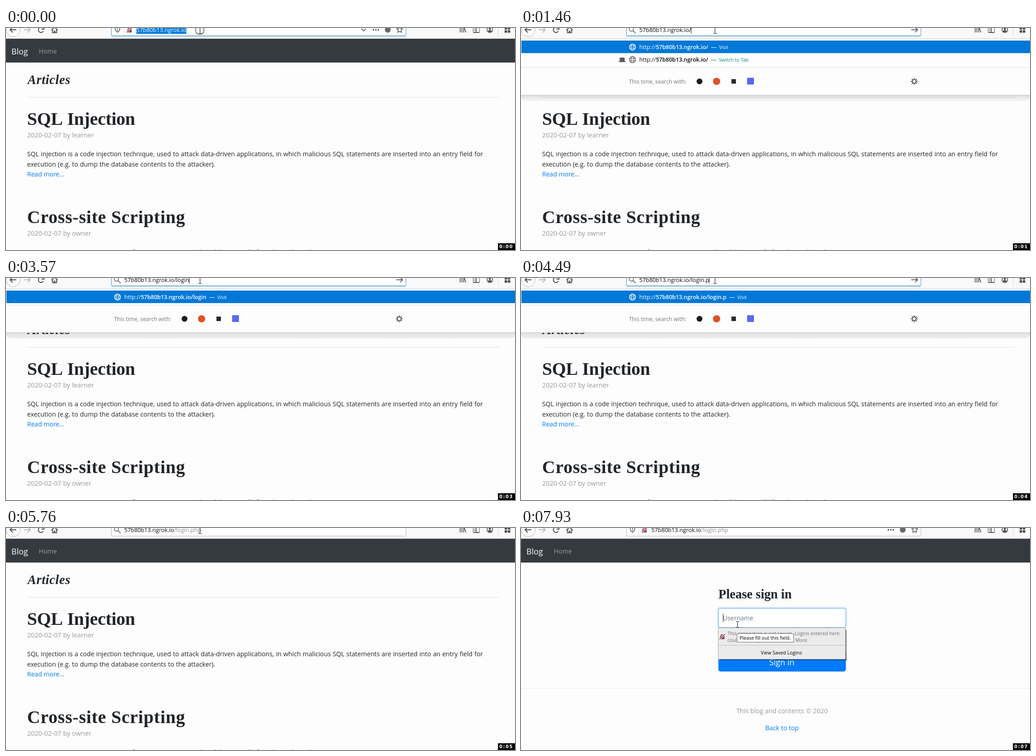
Recreate the animation shown at these times as an HTML page with a canvas. Size 1132 by 495 pixels, loop 8 s.

```html
<!DOCTYPE html>
<html lang="en">
<head>
<meta charset="utf-8">
<title>Blog sign in</title>
<style>
html, body { margin: 0; width: 100%; height: 100%; overflow: hidden; background: #fdfdfd; }
canvas { display: block; }
</style>
</head>
<body>
<canvas id="stage" width="1132" height="495"></canvas>
<script>
const W = 1132, H = 495, LOOP = 8000;
const ctx = document.getElementById('stage').getContext('2d', { alpha: false });
const SANS = '"Open Sans", "Noto Sans", sans-serif';
const SERIF = '"Liberation Serif", "Noto Serif", serif';
const CLOCK_FACE = '"DejaVu Sans", sans-serif';
const HOST = '57b80b13.ngrok.io';
const INK = '#212529', ICON = '#4c4c50', LINK = '#007bff', BLUE = '#0078d7';

// [time, path in the address bar]
const TYPED = [[1320, '/'], [2440, '/l'], [2680, '/lo'], [3070, '/log'], [3320, '/logi'],
  [3570, '/login'], [4100, '/login.'], [4370, '/login.p'], [4790, '/login.ph'], [5210, '/login.php']];
// [time, path in the suggestion row]
const SUGGESTED = [[1460, '/'], [2560, '/l'], [2680, '/lo'], [3170, '/log'], [3320, '/logi'],
  [3570, '/login'], [4220, '/login.'], [4490, '/login.p'], [4790, '/login.ph'], [5330, '/login.php']];
const CLOCK = [[0, 0], [1030, 1], [2140, 2], [3170, 3], [4000, 4], [5060, 5], [6120, 6], [7190, 7]];
const CARET_OFF = [[0, 150], [400, 930], [2020, 2440], [2950, 3070], [3880, 4100], [4940, 5210], [5480, LOOP]];

const at = (list, t) => list.reduce((v, [from, value]) => t >= from ? value : v, '');
const within = (t, a, b) => t >= a && t < b;

function rect(x, y, w, h, color) {
  ctx.fillStyle = color;
  ctx.fillRect(x, y, w, h);
}

function text(str, x, y, size, color, o = {}) {
  ctx.font = `${o.style || ''} ${size}px ${o.face || SANS}`;
  ctx.letterSpacing = (o.gap || 0) + 'px';
  ctx.wordSpacing = (o.space || 0) + 'px';
  ctx.textAlign = o.align || 'left';
  ctx.fillStyle = color;
  ctx.fillText(str, x, y);
  return ctx.measureText(str).width;
}

// Open polyline from flat coordinates
function line(points, color = ICON, width = 1.6) {
  ctx.beginPath();
  for (let i = 0; i < points.length; i += 2) ctx.lineTo(points[i], points[i + 1]);
  ctx.strokeStyle = color;
  ctx.lineWidth = width;
  ctx.stroke();
}

function arc(x, y, r, color = ICON, width = 1.6, a = 0, b = Math.PI * 2) {
  ctx.beginPath();
  ctx.arc(x, y, r, a, b);
  ctx.strokeStyle = color;
  ctx.lineWidth = width;
  ctx.stroke();
}

function dot(x, y, r, color) {
  ctx.beginPath();
  ctx.arc(x, y, r, 0, Math.PI * 2);
  ctx.fillStyle = color;
  ctx.fill();
}

function box(x, y, w, h, r, fill, stroke) {
  ctx.beginPath();
  ctx.roundRect(x, y, w, h, r);
  if (fill) { ctx.fillStyle = fill; ctx.fill(); }
  if (stroke) { ctx.strokeStyle = stroke; ctx.lineWidth = 1; ctx.stroke(); }
}

function lock(x, y) {
  box(x - 5, y - 1, 10, 7, 1, '#5a5a5e');
  arc(x, y - 1, 3, '#5a5a5e', 1.8, Math.PI, 0);
  line([x - 6, y + 6, x + 6, y - 5], '#fff', 3.5);
  line([x - 6, y + 6, x + 6, y - 5], '#e22850', 2);
}

function globe(x, y, color) {
  arc(x, y, 6.8, color, 1.5);
  ctx.beginPath();
  ctx.ellipse(x, y, 3, 6.8, 0, 0, Math.PI * 2);
  ctx.lineWidth = 1.1;
  ctx.stroke();
  line([x - 6.5, y - 2.5, x + 6.5, y - 2.5], color, 1.1);
  line([x - 6.5, y + 2.5, x + 6.5, y + 2.5], color, 1.1);
}

function gear(x, y) {
  for (let i = 0; i < 8; i++) {
    const c = Math.cos(i * Math.PI / 4), s = Math.sin(i * Math.PI / 4);
    line([x + c * 4, y + s * 4, x + c * 7.5, y + s * 7.5], ICON, 2);
  }
  arc(x, y, 4, ICON, 1.7);
}

function star(x, y) {
  const pts = [];
  for (let i = 0; i <= 10; i++) {
    const r = i % 2 ? 3.4 : 7, a = i * Math.PI / 5 - Math.PI / 2;
    pts.push(x + r * Math.cos(a), y + r * Math.sin(a));
  }
  line(pts, ICON, 1.4);
}

function toolbar(t) {
  rect(0, 0, W, 24, '#f9f9fa');
  rect(0, 23, W, 1, '#d4d4d6');
  dot(16, 4, 15.5, '#fdfdfd');
  arc(16, 4, 15.5, '#b4b4b6', 1);
  line([23, 4, 10, 4], ICON, 2);
  line([15, -2, 9, 4, 15, 10], ICON, 2);
  line([40, 4, 53, 4], '#bcbcbe', 2);
  line([48, -2, 54, 4, 48, 10], '#bcbcbe', 2);
  if (within(t, 5890, 6730)) {
    line([72, -1, 84, 10], '#c6c6c8', 1.8);
    line([84, -1, 72, 10], '#c6c6c8', 1.8);
  } else {
    arc(78, 4, 6, ICON, 2, 0.5, 5.3);
    line([84.5, -3, 84.5, 2.5, 79, 2.5], ICON, 2);
  }
  line([101, 5, 108, -2, 115, 5], ICON, 2);
  line([103.5, 4, 103.5, 10.5, 112.5, 10.5, 112.5, 4], ICON, 2);
  rect(106.5, 6, 3, 5, ICON);

  for (const x of [1010, 1014, 1018]) line([x, -2, x, 10], ICON, 1.7);
  line([1019, -1, 1023, 10], ICON, 1.7);
  box(1039, -4, 14, 14, 2, null, ICON);
  line([1039, 10, 1053, 10], ICON, 1.8);
  line([1046, -2, 1046, 10], ICON, 1.5);
  line([1041, 2.5, 1045, 2.5], ICON, 1.2);
  line([1041, 6, 1045, 6], ICON, 1.2);
  arc(1076, 4, 6.3, ICON, 1.5);
  dot(1076, 2, 2.4, ICON);
  box(1072, 5, 8, 4, 2, ICON);
  rect(1094, 0, 1, 19, '#d6d6d8');
  for (const x of [1109, 1116]) {
    rect(x, -1, 5.5, 4.5, ICON);
    rect(x, 5, 5.5, 5.5, ICON);
  }
}

function addressBar(t) {
  const focused = t < 5760, typing = within(t, 1320, 6370);
  box(234.5, -10.5, 655, 28.5, 2, '#fff', focused ? '#3d8fc9' : '#b5b5b7');
  if (focused) rect(236, 17, 652, 1, '#3d8fc9');
  const path = t < 1320 ? '' : at(TYPED, t);
  const x = typing ? 263 : 290;
  if (typing) {
    arc(245.5, 2.5, 4.6, '#77777a', 1.8);
    line([249, 6, 255, 11.5], '#77777a', 2.2);
    if (focused) {
      line([868, 4, 882, 4], ICON, 1.7);
      line([876.5, -1.5, 882, 4, 876.5, 9.5], ICON, 1.7);
    }
  } else {
    line([243, -2, 243, 3, 245, 7, 248, 9.5, 251, 7, 253, 3, 253, -2], ICON, 1.5);
    rect(247.5, -1, 1.2, 8, ICON);
    rect(261, 0, 1, 17, '#dedee0');
    lock(274.5, 4);
    if (t < 6610) line([790.5, 1.5, 795.5, 6.5, 800.5, 1.5], ICON, 1.6);
    for (const d of [817, 822.5, 828]) dot(d, 4, 1.8, ICON);
    dot(849, 4, 6.5, '#68686c');
    star(875.5, 4);
  }
  const selected = t < 150;
  if (selected) rect(290, 0, 111, 13, BLUE);
  const w = text(HOST, x, 9, 12.7, selected ? '#fff' : '#0c0c0d');
  const pw = text(path, x + w, 9, 12.7, focused ? '#0c0c0d' : '#8c8c90');
  if (!CARET_OFF.some(([a, b]) => within(t, a, b))) rect(Math.round(x + w + pw), 0, 1, 12, '#000');
}

function suggestion(y, path, color, action, actionColor) {
  globe(248, y - 4.5, color === '#fff' ? '#fff' : '#5a5a5e');
  let x = 263;
  x += text('http://', x, y, 12.6, color);
  x += text(HOST + path, x, y, 12.6, color, { style: '600', gap: -0.04 }) + 6;
  text('—', x, y, 13, actionColor);
  text(action, x + 18, y, 10.8, actionColor);
}

function dropdown(t) {
  const tall = t < 2560, bottom = tall ? 150 : 122, foot = bottom - 62;
  const fade = ctx.createLinearGradient(0, bottom, 0, bottom + 13);
  fade.addColorStop(0, 'rgba(0,0,0,.14)');
  fade.addColorStop(.3, 'rgba(0,0,0,.09)');
  fade.addColorStop(1, t < 1580 ? 'rgba(0,0,0,.03)' : 'rgba(0,0,0,.06)');
  box(0, bottom - 10, W, 23, [0, 0, 10, 10], fade);
  rect(0, 24, W, bottom - 24, '#fdfdfd');
  rect(0, bottom - 1, W, 1, '#d2d2d2');
  rect(1, 28, W - 1, 28, BLUE);
  suggestion(47, at(SUGGESTED, t), '#fff', 'Visit', '#fff');
  if (tall) {
    suggestion(75, '/', '#0c0c0d', 'Switch to Tab', '#058b7f');
    box(219.5, 66, 11, 8, 1, '#5a5a5e');
    rect(217.5, 74, 15, 2, '#5a5a5e');
  }
  rect(0, foot, W, 1, '#dcdcdc');
  const y = foot + 31;
  text('This time, search with:', 240, y + 5, 12.3, '#737377');
  dot(397, y, 6.5, '#1c1c1c');
  dot(435, y, 8, '#de5028');
  rect(468, y - 5, 10, 10, '#2a2a2a');
  rect(503, y - 8, 15, 15, '#5b67f2');
  gear(874.5, y);
}

function nav() {
  rect(0, 24, W, 53, '#343a40');
  text('Blog', 12, 59, 18, '#fff');
  text('Home', 73, 57, 14.2, '#9a9da0');
}

function article(y, title, gap, author, lines) {
  text(title, 47, y, 40, INK, { style: 'bold', face: SERIF, gap });
  text('2020-02-07 by ' + author, 47, y + 28, 14.6, '#999');
  lines.forEach((s, i) => text(s, 47, y + 70 + i * 23, 14.2, INK, { space: 0.45 }));
}

function articles() {
  text('Articles', 48, 125, 28.5, INK, { style: 'italic bold', face: SERIF, gap: 0.65 });
  rect(47, 154, 1050, 1, '#dfdfdf');
  article(216, 'SQL Injection', -0.25, 'learner', [
    'SQL injection is a code injection technique, used to attack data-driven applications, in which malicious SQL statements are inserted into an entry field for',
    'execution (e.g. to dump the database contents to the attacker).']);
  text('Read more...', 47, 331, 14.1, LINK);
  article(435, 'Cross-site Scripting', 0.8, 'owner', [
    'Cross-site scripting (XSS) is a type of computer security vulnerability typically found in web applications.']);
}

function signIn(t) {
  text('Please sign in', 439, 157, 28.5, INK, { style: 'bold', face: SERIF });
  box(436.5, 176.5, 288, 47, 6, '#bfdeff');
  box(439.5, 179.5, 282.5, 42, 4, '#fff', '#80bdff');
  text('Username', 449, 206, 14, '#6c757d');
  if (!within(t, 6970, 7430)) rect(449, 191, 1, 19, '#222');
  box(439, 274, 283.5, 46, 5, LINK);
  text('Sign in', 580, 306, 18.2, '#fff', { align: 'center' });
  if (t >= 6490) {
    rect(722, 227, 2, 68, 'rgba(0,0,0,.5)');
    rect(443, 293, 281, 2, 'rgba(0,0,0,.4)');
    box(438.5, 222.5, 283, 70, 0, '#ebebeb', '#a3a3a3');
    rect(439, 261, 282, 1, '#bcbcbc');
    lock(447.5, 242);
    text('This connection is not secure. Logins entered here', 459, 239, 10.7, '#6e6e6e');
    text('could be compromised. Learn More', 459, 254, 10.7, '#6e6e6e');
    text('View Saved Logins', 579, 282, 10.8, '#000', { align: 'center' });
  }
  rect(0, 357, W, 1, '#e8e8e8');
  text('This blog and contents © 2020', 580.5, 413, 14.35, '#999', { align: 'center' });
  text('Back to top', 580.5, 451, 14.2, LINK, { align: 'center' });
  if (t >= 7930) {
    box(480.5, 235.5, 126, 19, 0, '#fff', '#6a6a6a');
    text('Please fill out this field.', 486, 249, 10.65, '#000');
  }
}

function pointer(t) {
  // The mouse is sampled every 120 ms on its way to the field
  const k = Math.min(1, Math.max(0, Math.floor((t - 6490) / 120) / 5));
  const e = k * k * (3 - 2 * k), x = Math.round(431 + 50 * e), y = Math.round(5 + 209 * e);
  if (t < 150) {
    dot(x, y, 9.5, 'rgba(255,255,255,.7)');
    arc(x, y, 9.5, '#333', 1.2);
  }
  if (y > 20 && y < 179) {
    ctx.beginPath();
    for (const [dx, dy] of [[0, 0], [0, 16], [4, 12.5], [6.5, 18], [9, 17], [6.5, 11.5], [11.5, 11.5]]) ctx.lineTo(x + dx, y + dy);
    ctx.closePath();
    ctx.fillStyle = '#fff';
    ctx.fill();
    ctx.strokeStyle = '#000';
    ctx.lineWidth = 1;
    ctx.stroke();
    return;
  }
  rect(x, y - 5, 1, 12, '#000');
  for (const dy of [-6, 7]) {
    rect(x - 3, y + dy, 3, 1, '#000');
    rect(x + 1, y + dy, 3, 1, '#000');
  }
}

function timer(t) {
  rect(1094, 480, 38, 15, '#000');
  text('0:0' + at(CLOCK, t), 1097, 491, 10, '#fff', { style: 'bold', face: CLOCK_FACE, gap: 1.5 });
}

function draw(t) {
  rect(0, 0, W, H, '#fdfdfd');
  nav();
  if (t < 6370) articles(); else signIn(t);
  if (within(t, 1460, 5760)) dropdown(t);
  toolbar(t);
  addressBar(t);
  pointer(t);
  timer(t);
}

const start = performance.now();
function tick() {
  draw((performance.now() - start) % LOOP);
  requestAnimationFrame(tick);
}
tick();
</script>
</body>
</html>
```
